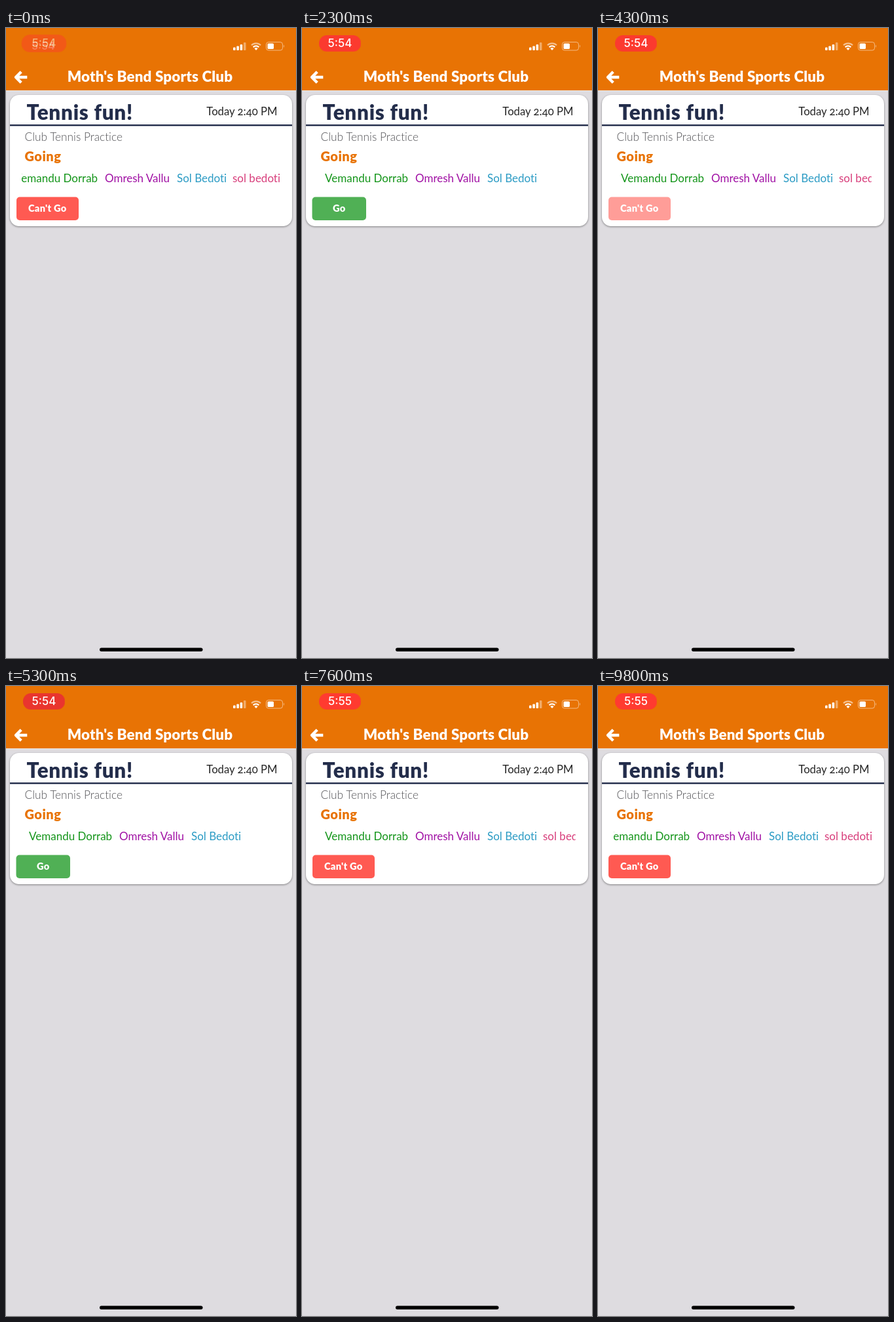
Recreate the animation shown at these times as an HTML page. Size 443 by 960 pixels, loop 9900 ms.

```html
<!DOCTYPE html>
<html lang="en">
<head>
<meta charset="utf-8">
<title>Sports club event</title>
<style>
  html, body { margin: 0; width: 100%; height: 100%; overflow: hidden; background: #dedce0; }
  svg { display: block; }
  text { font-family: Lato, "Open Sans", sans-serif; font-size: 17px; font-variant-ligatures: none; }
  .black { font-weight: 900; }
  .mid { text-anchor: middle; }
  .clock { font: 500 17px Inter, Roboto, sans-serif; fill: #fff; text-anchor: middle; }
  .heading { font-size: 22.4px; letter-spacing: .17px; fill: #fff; }
  .title { font-size: 31.5px; letter-spacing: .7px; fill: #232d4b; }
  .when { font-size: 16.7px; font-variant-numeric: oldstyle-nums; text-anchor: end; fill: #262626; }
  .about { font-size: 17.3px; font-weight: 300; fill: #505054; }
  .going { font-size: 20px; letter-spacing: .5px; fill: #e87304; }
  .label { font-size: 14.6px; letter-spacing: .3px; fill: #fff; }
  .card { filter: drop-shadow(0 1px 1.5px rgba(0, 0, 0, .42)); }
  #pill { transform-box: fill-box; transform-origin: center; }
  #oldClock { font-size: 16px; font-weight: 600; }
</style>
</head>
<body>
<svg width="443" height="960" viewBox="0 0 443 960">
  <defs>
    <clipPath id="row"><rect x="24" y="212" width="394" height="34"/></clipPath>
  </defs>
  <rect width="443" height="960" fill="#dedce0"/>
  <rect width="443" height="95" fill="#e87304"/>
  <rect y="95" width="443" height="1" fill="#ece6e2"/>

  <!-- status bar -->
  <text id="oldClock" class="clock" x="57" y="33">5:54</text>
  <g id="badge">
    <rect id="pill" x="26" y="11" width="64" height="25" rx="12"/>
    <text id="early" class="clock" x="58" y="29">5:54</text>
    <text id="late" class="clock" x="58" y="29">5:55</text>
  </g>
  <g fill="#fff">
    <rect x="347" y="29.5" width="3.6" height="4.5" rx="1"/>
    <rect x="352.3" y="27.5" width="3.6" height="6.5" rx="1"/>
    <rect x="357.6" y="25" width="3.6" height="9" rx="1"/>
    <rect x="362.9" y="22" width="3.6" height="12" rx="1" opacity=".4"/>
    <path d="M382 34l-2.6-2.7a3.7 3.7 0 0 1 5.2 0z"/>
    <rect x="399.5" y="23.5" width="9.5" height="8.5" rx="1.6"/>
    <path d="M424 25.5q2 2 0 4.5z" opacity=".5"/>
  </g>
  <g fill="none" stroke="#fff">
    <path d="M377.7 29.2a6.1 6.1 0 0 1 8.6 0" stroke-width="2.3"/>
    <path d="M375 26.2a9.9 9.9 0 0 1 14 0" stroke-width="2.2" opacity=".55"/>
    <rect x="397.5" y="21.5" width="25" height="12.5" rx="3.5" opacity=".5"/>
    <path d="M32.3 75H16M23.2 66.8L15 75l8.2 8.2" stroke-width="4.4" stroke-linejoin="round"/>
  </g>
  <text class="black mid heading" x="220" y="82">Moth's Bend Sports Club</text>

  <!-- event card -->
  <rect class="card" x="6" y="102" width="431" height="200" rx="14" fill="#fff"/>
  <rect x="6" y="147" width="431" height="2.4" fill="#232d4b"/>
  <text class="black title" x="31.5" y="140">Tennis fun!</text>
  <text class="when" x="414.5" y="133">Today 2:40 PM</text>
  <text class="about" x="28.5" y="171.5">Club Tennis Practice</text>
  <text class="black going" x="28.5" y="203">Going</text>
  <g clip-path="url(#row)">
    <g id="names">
      <text x="35" y="235" fill="#14951a">Vemandu Dorrab</text>
      <text x="173" y="235" fill="#a010a4">Omresh Vallu</text>
      <text x="283" y="235" fill="#2b9bc4">Sol Bedoti</text>
      <text id="self" x="368" y="235" fill="#d83f7c">sol bedoti</text>
    </g>
  </g>
  <g id="leave">
    <rect x="16" y="257.5" width="95" height="35.5" rx="5" fill="#ff5a52"/>
    <text class="black mid label" x="63.3" y="280">Can't Go</text>
  </g>
  <g id="join">
    <rect x="15.5" y="257.5" width="82.5" height="35.5" rx="5" fill="#50b055"/>
    <text class="black mid label" x="56.7" y="280">Go</text>
  </g>
  <rect x="143" y="944.5" width="157.5" height="5.5" rx="2.75" fill="#000"/>
</svg>
<script>
  const LOOP = 9900;
  const CUT = 'steps(1, end)';
  const PRESSED = 0.2;

  // steps: [ms, value, easing towards the next step]
  function play(id, prop, steps, easing = 'linear') {
    const last = steps[steps.length - 1];
    const rows = last[0] < LOOP ? [...steps, [LOOP, last[1]]] : steps;
    document.getElementById(id).animate(
      rows.map(([ms, value, ease]) => ({ offset: ms / LOOP, [prop]: value, easing: ease || easing })),
      { duration: LOOP, iterations: Infinity }
    );
  }

  // A button fades under the finger, recovers, then gives way to the other.
  const press = (down, swap) => [
    [down, 1], [down + 100, PRESSED], [down + 200, PRESSED],
    [swap - 50, 1, CUT], [swap, 0, CUT]
  ];

  play('leave', 'opacity', [[0, 1], ...press(1150, 1600), [3000, 1], ...press(4250, 4700), [6200, 1]]);
  play('join', 'opacity', [[0, 0, CUT], [1600, 1], ...press(2550, 3000), [4700, 1], ...press(5750, 6200)]);
  play('self', 'opacity', [[0, 1], [1600, 0], [3000, 1], [4700, 0], [6200, 1]], CUT);

  const shift = x => `translateX(${x}px)`;
  play('names', 'transform', [
    [0, shift(-22), CUT], [1600, shift(0)], [8300, shift(0), 'ease-out'], [9000, shift(-22)]
  ]);

  play('early', 'opacity', [[0, 1], [6000, 0]], CUT);
  play('late', 'opacity', [[0, 0], [6000, 1]], CUT);
  play('badge', 'opacity', [[0, 0.45], [250, 1]]);
  play('oldClock', 'opacity', [[0, 0.5], [200, 0]]);
  play('pill', 'transform', [[0, 'scale(1.07)'], [250, 'scale(1)']]);

  // Recording badge dims and brightens every two seconds.
  const bright = '#ff3b30', dim = '#dc322c';
  const pulse = [];
  for (let t = 0; t < LOOP; t += 2000) {
    pulse.push([t, bright], [t + 250, bright], [t + 650, dim], [t + 1150, dim], [t + 1550, bright]);
  }
  play('pill', 'fill', pulse);
</script>
</body>
</html>
```
